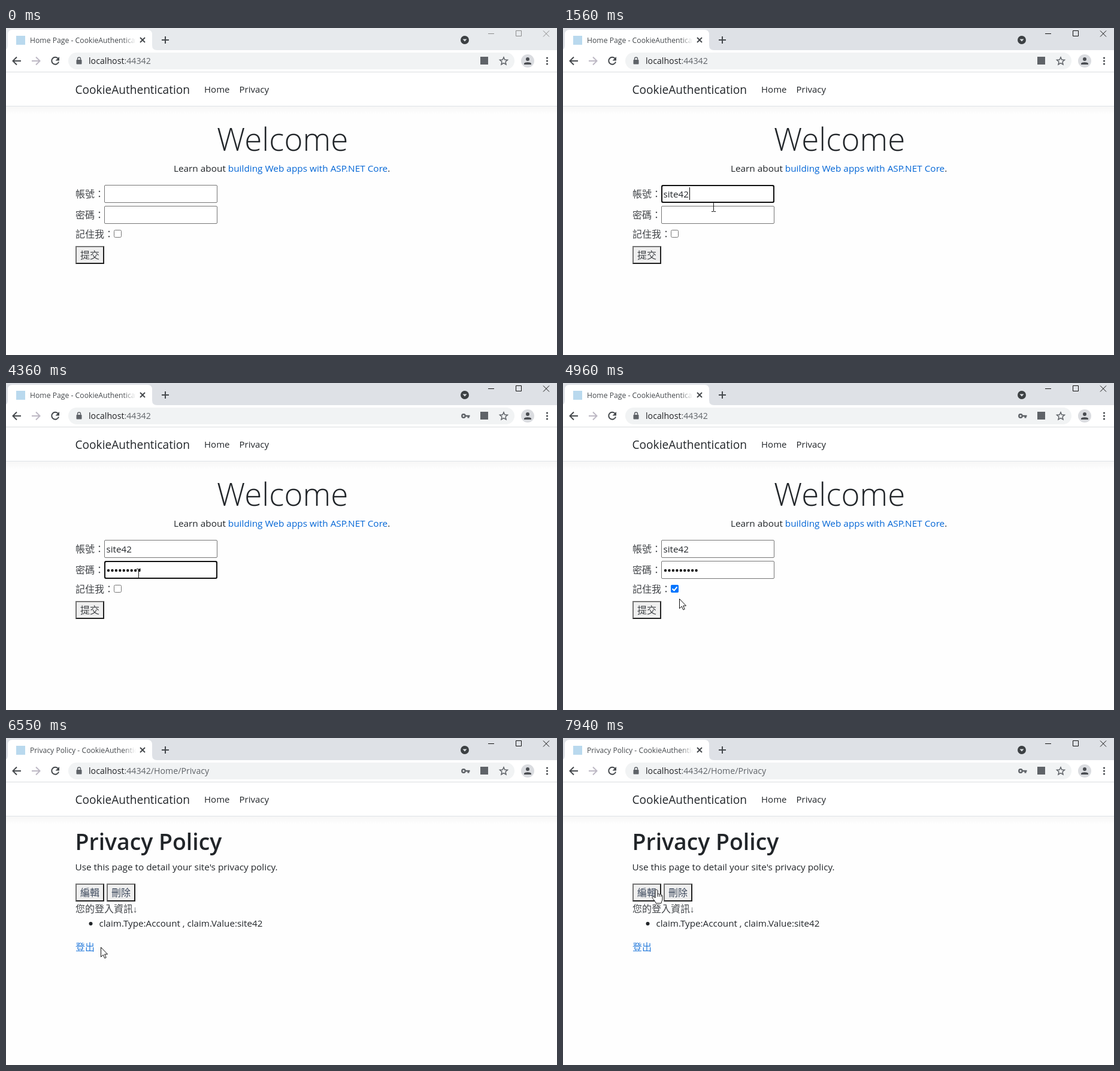
These frames come from a looping animation (920 by 546 pixels, 8 s). An HTML page:

```html
<!DOCTYPE html>
<html lang="zh-Hant">
<head>
<meta charset="utf-8">
<title>Login demo</title>
<style>
html, body { margin: 0; width: 100%; height: 100%; overflow: hidden; background: #fefefe; }
svg { display: block; }
text { font: 15.2px "Open Sans", "Noto Sans", sans-serif; fill: #212529; white-space: pre; }
.zh { font: 300 16px "Noto Sans CJK TC", "Noto Sans CJK", sans-serif; fill-opacity: .85; }
.brand { font-size: 19.1px; }
.nav { font-size: 15px; }
.lead { font-size: 15.35px; }
.hero { font-size: 53px; font-weight: 300; }
.h1 { font-size: 37.4px; font-weight: 600; }
.url { font-size: 14.2px; fill: #5f6368; }
.tab { font-size: 12.2px; fill: #45494d; }
.link { fill: #0366d6; }
.edit { fill: #1c2a42; }
.arrow { font: bold 15px "Liberation Sans", sans-serif; }
.line { fill: none; stroke: #45494d; stroke-width: 2; }
.box { fill: #fff; stroke: #767676; }
.focus { fill: #fff; stroke: #101010; stroke-width: 2; }
.cursor { fill: #fff; stroke: #111; }
</style>
</head>
<body>
<svg width="920" height="546">
  <defs>
    <linearGradient id="fade"><stop stop-color="#fff" stop-opacity="0"/><stop offset="1" stop-color="#fff"/></linearGradient>
    <linearGradient id="shade" x2="0" y2="1"><stop stop-opacity=".03"/><stop offset="1" stop-opacity="0"/></linearGradient>
    <clipPath id="tabClip"><path d="M36 5H217V36H36Z"/></clipPath>
    <g id="button">
      <path d="M0 0H48V30H0Z" fill="#212121"/>
      <path d="M0 0H48L46 2V28H2L0 30Z" fill="#767676"/>
      <path d="M2 2H46V28H2Z" fill="#efefef"/>
    </g>
  </defs>

  <!-- Browser frame -->
  <path id="strip" d="M0 0H920V37H0Z"/>
  <path d="M-5 37Q3 37 3 29V11Q3 3 11 3H236Q244 3 244 11V29Q244 37 252 37H920V73H0V37Z" fill="#fff"/>
  <path d="M0 73.5H920" stroke="#dadce0"/>
  <path id="favicon" d="M17 13H32V28H17Z" fill="#b9d9ee"/>
  <path id="spinner" d="M24.5 13.5A7 7 0 0 1 31.5 20.5" fill="none" stroke="#8ab4f8" stroke-width="2"/>
  <g clip-path="url(#tabClip)">
    <text id="tabTitle" class="tab" x="40" y="25"></text>
    <path d="M195 5H217V36H195Z" fill="url(#fade)"/>
  </g>
  <path class="line" stroke-width="1.6" d="M224 16L232 24M232 16L224 24M260 20H272M266 14V26"/>
  <circle cx="766" cy="20" r="7" fill="#3c4043"/>
  <path d="M762.5 18.5H769.5L766 22.5Z" fill="#dee1e6"/>
  <path id="winButtons" fill="none" d="M805 9.5H815M851.5 4.5H860.5V13.5H851.5ZM897 4.5L907 14.5M907 4.5L897 14.5"/>

  <path class="line" d="M25 55H12M18 48.5L11.5 55L18 61.5"/>
  <path class="line" style="stroke:#bdb8c4" d="M43 55H56M50 48.5L56.5 55L50 61.5"/>
  <g id="reload">
    <path class="line" d="M87 51A6 6 0 1 0 88 56.5"/>
    <path d="M89 48V54.5H82.5Z" fill="#45494d"/>
  </g>
  <path id="stop" class="line" d="M76.5 49.5L87.5 60.5M87.5 49.5L76.5 60.5"/>
  <rect x="104" y="41" width="745" height="28" rx="14" fill="#f1f3f4"/>
  <rect x="117.5" y="53" width="9" height="7.5" rx="1" fill="#5f6368"/>
  <path class="line" style="stroke:#5f6368;stroke-width:1.5" d="M119.5 53.5V51.5A2.5 2.5 0 0 1 124.5 51.5V53.5"/>
  <text class="url" x="138" y="60"><tspan fill="#202124">localhost</tspan>:44342<tspan id="path"></tspan></text>
  <g id="key">
    <circle cx="764" cy="55" r="2.7" fill="none" stroke="#5f6368" stroke-width="2.4"/>
    <path d="M767 53.8H774.5V56.2H773.5V58.5H770.5V56.2H767Z" fill="#5f6368"/>
  </g>
  <path id="translate" d="M792 48H805V61H792Z" fill="#5f6368"/>
  <path class="line" style="stroke:#5f6368;stroke-width:1.5" d="M831 48.8L832.8 53L837.5 53.4L834 56.5L835 61L831 58.6L827 61L828 56.5L824.5 53.4L829.2 53Z"/>
  <circle cx="871" cy="55" r="11" fill="#dadce0"/>
  <path d="M865 61V59.5C865 56.5 877 56.5 877 59.5V61ZM874 52A3 3 0 1 1 868 52A3 3 0 1 1 874 52Z" fill="#4a4d52"/>
  <path d="M903.5 50V60.1" stroke="#45494d" stroke-width="3.2" stroke-linecap="round" stroke-dasharray="0 5"/>

  <!-- Site header -->
  <path d="M0 74H920V130H0Z" fill="#fff"/>
  <path d="M0 131H920V144H0Z" fill="url(#shade)"/>
  <path d="M0 130.5H920" stroke="#dee2e6"/>
  <text class="brand" x="115.5" y="110">CookieAuthentication</text>
  <text class="nav" x="331" y="108">Home</text>
  <text class="nav" x="389.5" y="108">Privacy</text>

  <g id="login">
    <text class="hero" x="352" y="205">Welcome</text>
    <text class="lead" x="280" y="240">Learn about <tspan class="link">building Web apps with ASP.NET Core</tspan>.</text>
    <text class="zh" x="116" y="283">帳號：</text>
    <text class="zh" x="116" y="318">密碼：</text>
    <text class="zh" x="116" y="350">記住我：</text>
    <rect class="box" x="164.5" y="262.5" width="188" height="29" rx="1.5"/>
    <rect class="box" x="164.5" y="297.5" width="188" height="29" rx="1.5"/>
    <rect id="fieldFocus" class="focus" x="165" width="187" height="28" rx="2.5"/>
    <text id="account" x="167.5" y="283">site42</text>
    <path id="dots" stroke="#111" stroke-width="4.4" stroke-linecap="round" stroke-dasharray="0 6.45"/>
    <path id="caret" stroke="#000"/>
    <rect class="box" x="180.5" y="337.5" width="12" height="12" rx="2"/>
    <g id="check">
      <rect x="180" y="337" width="13" height="13" rx="2" fill="#0075ff"/>
      <path d="M182.5 343.5L185.5 346.5L190.5 340.5" fill="none" stroke="#fff" stroke-width="2"/>
    </g>
    <use href="#button" x="116" y="364"/>
    <rect id="buttonFocus" class="focus" style="fill:#efefef" x="117" y="365" width="46" height="28" rx="2.5"/>
    <text class="zh" x="124" y="385">提交</text>
  </g>

  <g id="policy">
    <text class="h1" x="115.5" y="187">Privacy Policy</text>
    <text class="lead" x="115.5" y="221">Use this page to detail your site's privacy policy.</text>
    <use href="#button" x="116" y="243"/>
    <use href="#button" x="168" y="243"/>
    <text class="zh edit" x="124" y="264">編輯</text>
    <text class="zh edit" x="176" y="264">刪除</text>
    <text class="zh" x="116" y="290.5">您的登入資訊<tspan class="arrow">↓</tspan></text>
    <circle cx="141.5" cy="310" r="3" fill="#212529"/>
    <text x="155.5" y="315">claim.Type:Account , claim.Value:site42</text>
    <text class="zh link" x="116" y="354.5">登出</text>
    <path id="underline" d="M116 357.5H148" stroke="#0056b3"/>
  </g>

  <g id="cursor">
    <path id="pointer" class="cursor" d="M.5.5V16.5L4.2 13L6.8 18.7L9.2 17.6L6.7 12H11.5Z"/>
    <path id="beam" d="M-3.5-7.5H-1Q0-7.5 0-6.5Q0-7.5 1-7.5H3.5M0-6.5V6.5M-3.5 7.5H-1Q0 7.5 0 6.5Q0 7.5 1 7.5H3.5" fill="none" stroke="#111"/>
    <g id="hand" class="cursor">
      <path d="M-2 14V2C-2-.3 2-.3 2 2V8C2 6.6 5 6.8 5 8.6C5 7.3 8 7.6 8 9.6C8 8.6 10 9 10 11V16C10 19 8 20 8 23H-1C-1 20-6 16-7 13.5C-7.5 11.5-4.5 11-2 14Z"/>
      <path d="M2 8V12M5 9V12M8 10V12"/>
    </g>
  </g>
</svg>
<script>
const LOOP = 8000;
const $ = id => document.getElementById(id);
const show = (id, on) => { $(id).style.display = on ? '' : 'none'; };
const set = (id, name, value) => $(id).setAttribute(name, value);
const inside = ([x, y], l, t, r, b) => x >= l && x <= r && y >= t && y <= b;

const moves = [
  [150, 930, 11, [330, 516], [200, 277]],
  [1560, 1800, 4, [251, 299], [245, 304]],
  [4030, 4810, 11, [243, 303], [187, 341]],
  [4880, 4960, 2, [188, 344], [194, 360]],
  [4960, 5420, 7, [194, 360], [145, 379]],
  [6550, 6850, 5, [158, 349], [149, 269]],
  [7160, 7540, 6, [148, 276], [138, 353]],
  [7680, 7940, 4, [143, 325], [156, 253]]
];

// Times at which the password reaches 6, 7, 8 and 9 characters
const keyTimes = [2090, 3100, 3270, 3560];

function pointerAt(t) {
  const move = moves.filter(m => m[0] <= t).pop();
  if (!move) return null;
  const [start, end, steps, a, b] = move;
  const step = Math.min(steps - 1, Math.floor((t - start) / (end - start) * (steps - 1) + 1e-6));
  return a.map((v, i) => Math.round(v + (b[i] - v) * step / (steps - 1)));
}

function drawPointer(t) {
  const p = pointerAt(t);
  const visible = p && !(t >= 1250 && t < 1560);
  show('cursor', visible);
  show('underline', visible && t >= 6550 && inside(p, 116, 338, 148, 360));
  if (!visible) return;
  const form = t < 6550;
  const beam = form && inside(p, 164, 262, 353, 327);
  const hand = form ? inside(p, 116, 364, 164, 394)
    : inside(p, 116, 243, 164, 273) || inside(p, 116, 338, 148, 360);
  show('beam', beam);
  show('hand', hand);
  show('pointer', !beam && !hand);
  const half = beam ? .5 : 0;
  set('cursor', 'transform', `translate(${p[0] + half} ${p[1]})`);
}

function drawForm(t) {
  const inAccount = t >= 860 && t < 1800;
  const inPassword = t >= 1800 && t < 4740;
  const typed = keyTimes.filter(k => k <= t).length;
  const count = typed ? typed + 5 : 0;
  show('fieldFocus', inAccount || inPassword);
  set('fieldFocus', 'y', inAccount ? 263 : 298);
  show('account', t >= 1250);
  show('dots', count);
  set('dots', 'd', `M171 313H${171.1 + 6.45 * (count - 1)}`);

  const blink = (t >= 2550 && t < 3100) || t >= 4090;
  show('caret', (inAccount || inPassword) && !blink);
  const x = inAccount ? (t < 1250 ? 168.5 : 211.5) : 168.5 + Math.floor(count * 6.45);
  set('caret', 'd', `M${x} ${inAccount ? 266 : 301}v21`);
  show('check', t >= 4880);
  show('buttonFocus', t >= 5590);
}

function drawBrowser(t) {
  const active = t >= 860;
  const loading = t >= 5670 && t < 5990;
  const done = t >= 5990;
  set('strip', 'fill', active ? '#dee1e6' : '#e7eaed');
  set('winButtons', 'stroke', active ? '#111' : '#8c8c8c');
  show('favicon', !loading);
  show('spinner', loading);
  set('spinner', 'transform', `rotate(${(t - 5830) * .3} 24.5 20.5)`);
  show('reload', !loading);
  show('stop', loading);
  show('translate', !loading);
  show('key', t >= 2090);
  set('key', 'transform', `translate(${loading ? 32 : 0} 0)`);
  $('path').textContent = loading || done ? '/Home/Privacy' : '';
  $('tabTitle').textContent = loading ? 'https://localhost:44342/Home/Privacy'
    : (done ? 'Privacy Policy' : 'Home Page') + ' - CookieAuthentication';
  show('login', !done);
  show('policy', done);
}

function draw(now) {
  const t = now % LOOP;
  drawBrowser(t);
  drawForm(t);
  drawPointer(t);
  requestAnimationFrame(draw);
}
draw(0);
</script>
</body>
</html>
```
